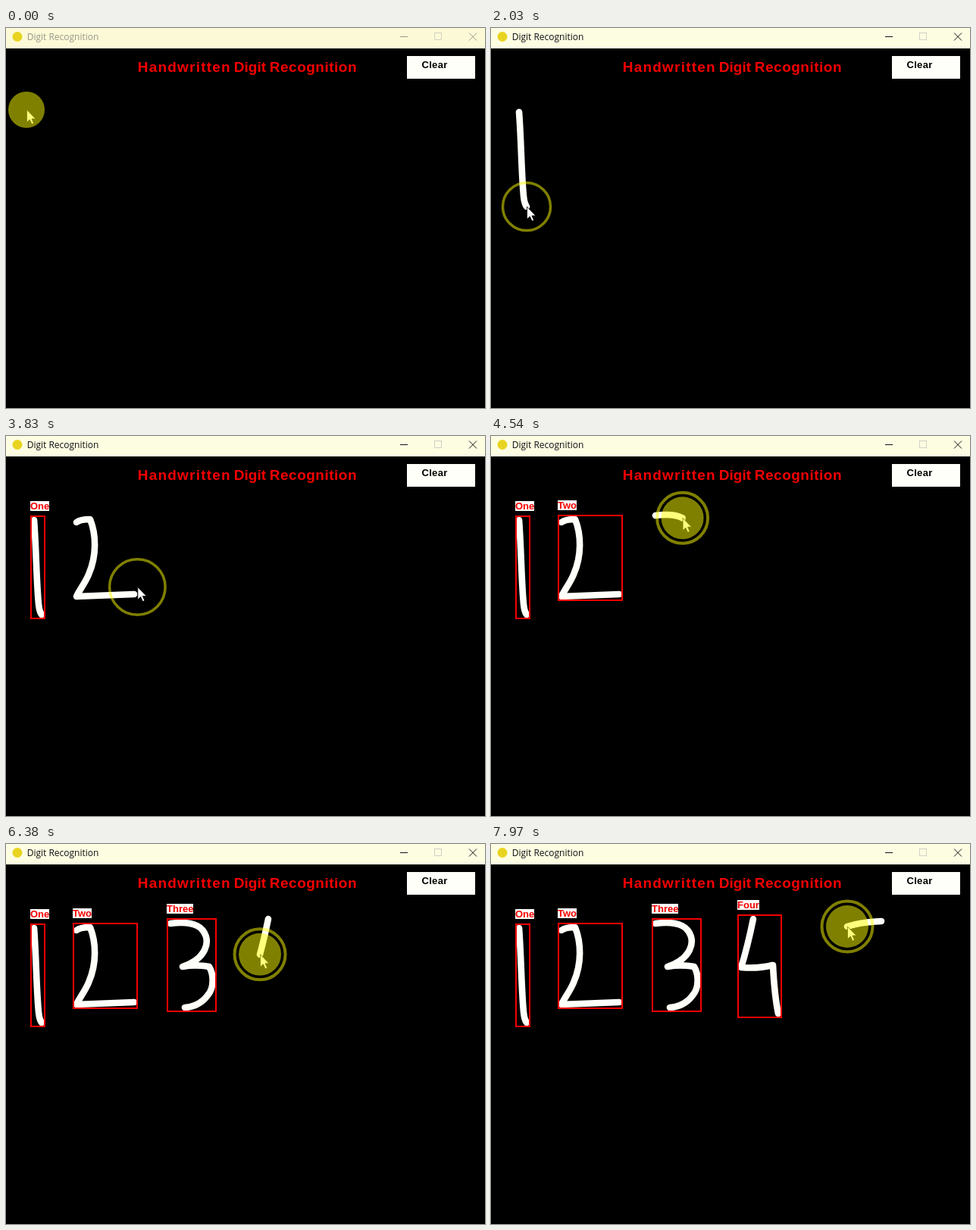
Recreate the animation shown at these times as an HTML page. Size 632x502 px, loop 8000 ms.

```html
<!DOCTYPE html>
<html lang="en">
<head>
<meta charset="utf-8">
<title>Digit Recognition</title>
<style>
  html, body { margin: 0; width: 100%; height: 100%; overflow: hidden; background: #000; }
  svg { display: block; width: 632px; height: 502px; }
  text { white-space: pre; }
  .bold { font: bold 13px "Liberation Sans", Arial, sans-serif; }
  .heading { font-size: 19px; fill: #f50000; }
  .caption { font: 12px "Open Sans", "Noto Sans", sans-serif; }
  .ink { fill: none; stroke: #fffffa; stroke-width: 8.6; stroke-linecap: round; stroke-linejoin: round; }
  .box { fill: none; stroke: #f50000; stroke-width: 2; }
</style>
</head>
<body>
<svg viewBox="0 0 632 502">
  <rect width="632" height="502"/>
  <rect id="bar" width="632" height="27"/>
  <circle cx="15" cy="11.5" r="6.5" fill="#e8d420"/>
  <text id="caption" class="caption" x="27.7" y="16">Digit Recognition</text>
  <g fill="none">
    <path id="controls" d="M520 11.5h10M611 6.5l10 10m0-10l-10 10"/>
    <rect x="565.5" y="6.5" width="9" height="9" stroke="#d2d0c4"/>
  </g>
  <g class="bold heading">
    <text x="173.8" y="58" letter-spacing="1.2">Handwritten</text>
    <text x="300.8" y="58">Digit</text>
    <text x="347.8" y="58" letter-spacing=".5">Recognition</text>
  </g>
  <rect x="529" y="37" width="90" height="30" fill="#fffffa"/>
  <text class="bold" x="548.5" y="53" letter-spacing=".3">Clear</text>
  <g id="strokes"></g>
  <g id="results"></g>
  <g id="pointer">
    <path d="M.5 0V16.5L4.3 13 7 19 9.6 18 7 12H12Z" fill="#fff" stroke="#000" stroke-width=".8"/>
    <circle id="glow" fill="#ff0" fill-opacity=".5"/>
    <circle id="ring" fill="none" stroke="#ff0" stroke-opacity=".5"/>
  </g>
</svg>
<script>
const LOOP = 8000;
const ACTIVATE = 420;     // first click only focuses the window
const HOLD = 60;          // button stays down after each stroke
const RECOGNISE = 700;    // wait from release to result
const RING_TIME = 400;

const digits = [
  { name: 'One', start: 1240, end: 1790,
    d: 'M37 111C40 150 40 190 43 222Q44 232 47 236' },
  { name: 'Two', start: 2830, end: 3490,
    d: 'M93 114Q98 110 111 110C119 130 120 158 109 183C104 195 97 203 93 212L169 209' },
  { name: 'Three', start: 4436, end: 5076,
    d: 'M217 105Q240 102 252 108C264 114 268 128 262 140C256 152 245 158 233 162Q250 159 268 162C274 172 275 190 266 200Q255 215 236 216' },
  { name: 'Four', start: 6251, end: 6718,
    d: 'M346 99Q338 138 330 163Q352 165 372 160Q374 200 379 224' },
  { name: 'Five', start: 7680, end: 7970, d: 'M515 102Q488 103 470 109' }
];

const $ = id => document.getElementById(id);
const clamp = p => Math.min(Math.max(p, 0), 1);
const progress = (t, from, to) => clamp((t - from) / (to - from));
const smooth = p => p * p * (3 - 2 * p);
const mix = (a, b, p) => ({ x: a.x + (b.x - a.x) * p, y: a.y + (b.y - a.y) * p });
const show = (node, visible) => node.style.display = visible ? '' : 'none';

function add(parent, tag, attrs, content = '') {
  const node = document.createElementNS('http://www.w3.org/2000/svg', tag);
  for (const key in attrs) node.setAttribute(key, attrs[key]);
  node.textContent = content;
  return parent.appendChild(node);
}

// The result frame and its label follow from the extent of the stroke.
function addResult(digit) {
  const b = digit.path.getBBox();
  const x = Math.round(b.x) - 4, y = Math.round(b.y) - 5;
  const width = Math.round(b.width) + 8, height = Math.round(b.height) + 10;
  const group = add($('results'), 'g', {});
  add(group, 'rect', { x, y, width, height, class: 'box' });
  const back = add(group, 'rect', { x: x - 1, y: y - 20, height: 13, fill: '#fffffa' });
  const label = add(group, 'text', { x: x - 1, y: y - 9, class: 'bold', fill: '#f50000' }, digit.name);
  back.setAttribute('width', Math.round(label.getComputedTextLength()));
  return group;
}

for (const digit of digits) {
  digit.path = add($('strokes'), 'path', { d: digit.d, class: 'ink' });
  digit.length = digit.path.getTotalLength();
  digit.release = digit.end + HOLD;
  digit.result = addResult(digit);
}

const presses = [
  { start: ACTIVATE, release: ACTIVATE + 80 },
  ...digits
];

const penAt = (digit, t) =>
  digit.path.getPointAtLength(digit.length * progress(t, digit.start, digit.end));

function pointerAt(t) {
  const last = digits.findLastIndex(digit => t >= digit.start);
  if (last < 0) {
    const point = mix({ x: 27, y: 108 }, penAt(digits[0], 0), smooth(progress(t, 0, 1050)));
    point.y += 30 * Math.sin(Math.PI * progress(t, 0, 2 * ACTIVATE)) ** 2;
    return point;
  }
  const from = digits[last], to = digits[last + 1];
  const pen = penAt(from, t);
  if (!to) return pen;
  return mix(pen, penAt(to, 0), smooth(progress(t, from.release + 200, to.start - 250)));
}

function setCircle(id, radius, width = 0) {
  $(id).setAttribute('r', radius);
  $(id).setAttribute('stroke-width', width);
}

function drawHighlight(t) {
  const press = presses.find(p => t >= p.start && t < p.release + RING_TIME);
  if (!press) {
    setCircle('glow', 24);
    setCircle('ring', 0);
  } else if (t < press.release) {
    const grow = progress(t, press.start, press.start + 80);
    setCircle('glow', 24 + 4 * grow);
    setCircle('ring', 24 + 9.5 * grow, 4);
  } else {
    setCircle('glow', 0);
    setCircle('ring', 22 + 21 * progress(t, press.release, press.release + RING_TIME), 3.5);
  }
}

function draw(t) {
  const active = t >= ACTIVATE;
  $('bar').setAttribute('fill', active ? '#fdfde2' : '#fcfad6');
  $('caption').setAttribute('fill', active ? '#111' : '#99978a');
  $('controls').setAttribute('stroke', active ? '#111' : '#99978a');

  for (const digit of digits) {
    const drawn = digit.length * progress(t, digit.start, digit.end);
    digit.path.setAttribute('stroke-dasharray', `${drawn + .01} ${digit.length + 20}`);
    show(digit.path, t >= digit.start);
    show(digit.result, t >= digit.release + RECOGNISE);
  }
  const { x, y } = pointerAt(t);
  $('pointer').setAttribute('transform', `translate(${x} ${y})`);
  drawHighlight(t);
}

const begin = performance.now();
function tick() {
  draw((performance.now() - begin) % LOOP);
  requestAnimationFrame(tick);
}
tick();
</script>
</body>
</html>
```
